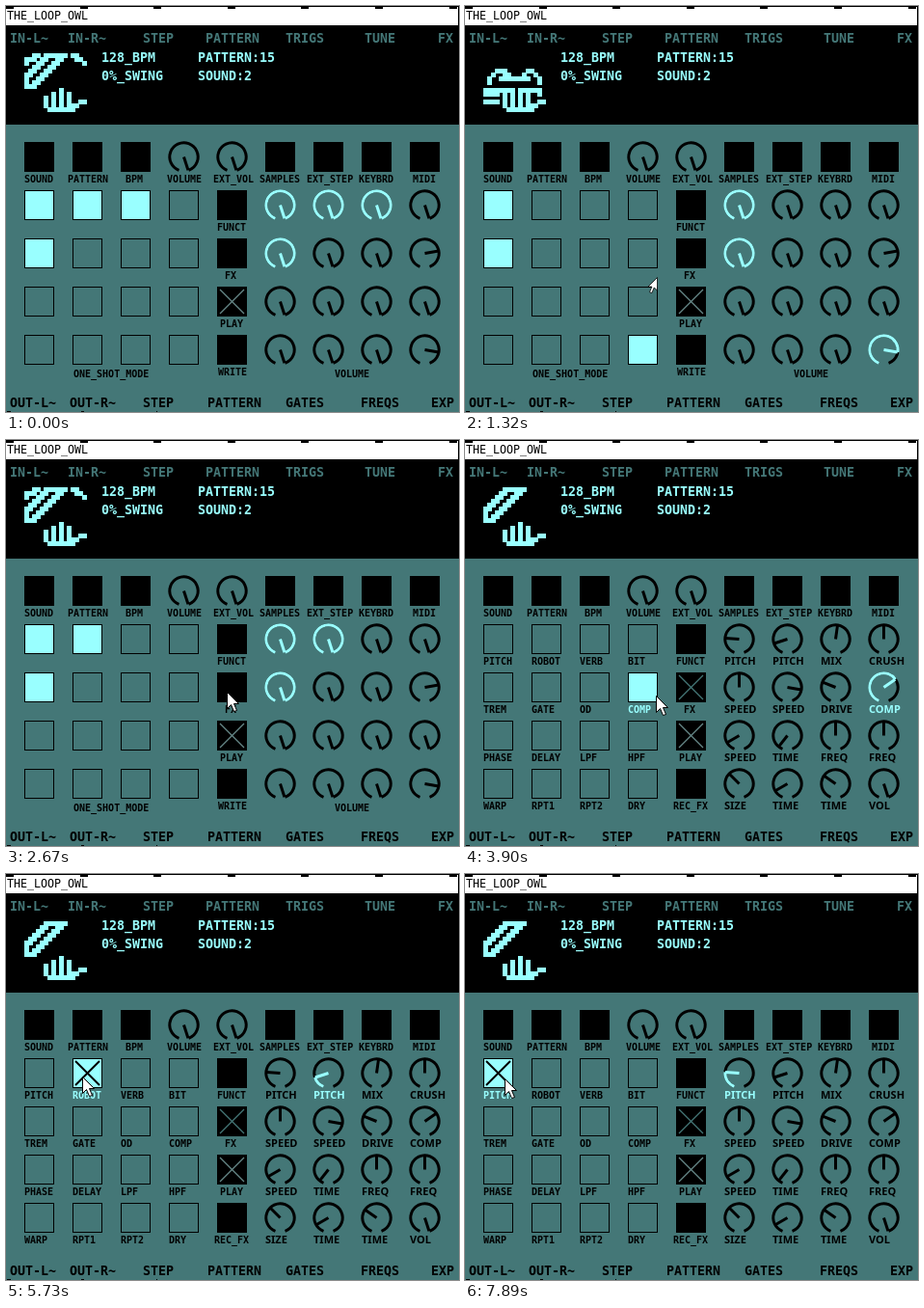
Recreate the animation shown at these times as an HTML page with a canvas. Size 470 by 421 pixels, loop 8000 ms.

```html
<!DOCTYPE html>
<html lang="en">
<head>
<meta charset="utf-8">
<title>Drum machine</title>
<style>
  html, body { margin: 0; width: 100%; height: 100%; overflow: hidden; background: #447777; }
  canvas { display: block; }
</style>
</head>
<body>
<canvas id="stage" width="470" height="421"></canvas>
<script>
const ctx = document.getElementById('stage').getContext('2d');
const LOOP = 8000, STEP = 111, ICON_STEP = 222;
const TEAL = '#447777', LIT = '#99ffff', BLACK = '#000';
const MONO = '"DejaVu Sans Mono", monospace';
const LARGE = `bold 13.3px ${MONO}`;
const SMALL = `bold 10px ${MONO}`;
const KNOB_FONT = 'bold 11px "Noto Sans", "Open Sans", sans-serif';

const FX_ON = 2850, ROBOT_ON = 5500, PITCH_ON = 6750;

const fxNames = ['PITCH', 'ROBOT', 'VERB', 'BIT', 'TREM', 'GATE', 'OD', 'COMP',
  'PHASE', 'DELAY', 'LPF', 'HPF', 'WARP', 'RPT1', 'RPT2', 'DRY'];
const fxKnobs = ['PITCH', 'PITCH', 'MIX', 'CRUSH', 'SPEED', 'SPEED', 'DRIVE', 'COMP',
  'SPEED', 'TIME', 'FREQ', 'FREQ', 'SIZE', 'TIME', 'TIME', 'VOL'];
const fxAngles = [-86, -108, 8, 0, 0, 100, -68, 55, -120, -142, 0, 0, -45, -120, -55, 162];

// Sequencer steps on which each pad lights up
const soundSteps = { 0: [0, 4, 8, 12], 1: [0, 8], 2: [0], 4: [0, 2, 4, 6, 8, 10, 12, 14], 15: [4, 12] };
const fxSteps = { 4: [0, 4, 8, 12], 7: [3, 7, 11] };

// Pointer path: time, x, y
const pointerPath = [
  [450, 480, 330], [700, 440, 310], [1320, 199, 281], [1900, 215, 275], [2400, 229, 261],
  [2800, 229, 261], [3300, 205, 262], [3900, 198, 265], [4140, 196, 264], [4920, 119, 253],
  [5480, 79, 211], [5820, 79, 210], [6030, 79, 210], [6600, 35, 214], [6900, 40, 218],
  [6930, 41, 217], [7590, 41, 217], [7890, 41, 212], [8000, 41, 212]
];

function rect(x, y, w, h, color) {
  ctx.fillStyle = color;
  ctx.fillRect(x, y, w, h);
}

function text(str, x, y, font = SMALL, color = BLACK) {
  ctx.font = font;
  ctx.fillStyle = color;
  ctx.fillText(str, x, y);
}

function line(x1, y1, x2, y2, color, width) {
  ctx.strokeStyle = color;
  ctx.lineWidth = width;
  ctx.beginPath();
  ctx.moveTo(x1, y1);
  ctx.lineTo(x2, y2);
  ctx.stroke();
}

const colX = col => 19 + 50 * col;
const rowY = row => 141 + 50 * row;

function button(col, row, fill, crossColor) {
  const x = colX(col), y = rowY(row);
  rect(x, y, 31, 31, BLACK);
  if (fill !== BLACK) rect(x + 1, y + 1, 29, 29, fill);
  if (!crossColor) return;
  const width = crossColor === BLACK ? 2 : 1.3;
  line(x + 3, y + 3, x + 28, y + 28, crossColor, width);
  line(x + 28, y + 3, x + 3, y + 28, crossColor, width);
}

function knob(col, row, degrees, lit) {
  const x = colX(col) + 15.5, y = rowY(row) + 15.5;
  const toRad = d => (d - 90) * Math.PI / 180;
  const arc = (from, to, color) => {
    ctx.strokeStyle = color;
    ctx.lineWidth = 3;
    ctx.beginPath();
    ctx.arc(x, y, 14.7, toRad(from), toRad(to));
    ctx.stroke();
  };
  arc(-160, 160, BLACK);
  if (lit) arc(-160, Math.min(degrees, 160), LIT);
  const a = toRad(degrees);
  line(x, y, x + 14.5 * Math.cos(a), y + 14.5 * Math.sin(a), lit ? LIT : BLACK, 3);
}

// Icon cells overlap by one pixel on a 4px pitch
function cells(col, row, w = 1, h = 1) {
  rect(19 + 4 * col, 49 + 4 * row, 4 * w + 1, 4 * h + 1, LIT);
}

function hand(drop = 0) {
  [11, 10, 9, 10].forEach((top, i) => cells(5 + 2 * i, top + drop, 1, 14 - top));
  cells(14, 12 + drop, 2);
  cells(12, 13 + drop, 2);
  cells(6, 14 + drop, 7);
}

function stick() {
  for (let i = 0; i < 6; i++) cells(5 - i, i, 2);
  for (let i = 0; i < 8; i++) cells(8 - i, i + 1, 2);
  cells(6, 0, 5);
  for (let i = 0; i < 4; i++) cells(9 - i, 1 + i);
  cells(0, 6, 1, 3);
  hand();
}

function crossedSticks() {
  stick();
  cells(2, 0, 2);
  cells(0, 1, 3);
  cells(0, 2, 1);
  cells(12, 0, 2);
  cells(13, 1, 2);
  cells(15, 2);
}

function face() {
  cells(3, 4, 3);
  cells(11, 4, 2);
  cells(2, 5);
  cells(5, 5, 2);
  cells(10, 5);
  cells(13, 5);
  cells(1, 6, 1, 2);
  cells(4, 6, 8);
  cells(14, 6, 1, 2);
  cells(0, 9, 7);
  cells(9, 9, 6);
  cells(0, 10, 4);
  cells(5, 9, 1, 4);
  cells(7, 9, 1, 4);
  cells(14, 10, 1);
  cells(0, 12, 4);
  cells(11, 9, 1, 4);
  hand();
}

function helmet() {
  for (let row = 0; row < 13; row++) {
    const left = Math.max(0, 7 - row);
    const right = Math.min(14, 11 + Math.floor(row * 0.8));
    cells(left, row, right - left + 1);
  }
  hand(1);
}

const A = crossedSticks, B = face, C = stick, D = helmet;
const icons = [A, B, C, B, C, A, B, C, A, B, C, B, A, B, D, B];

function drawIcon(t) {
  const index = Math.floor((t + 190) / ICON_STEP);
  icons[index % icons.length]();
}

function drawFrame() {
  rect(0, 0, 470, 421, TEAL);
  rect(0, 0, 470, 20, '#fff');
  rect(0, 0, 470, 1, BLACK);
  rect(469, 0, 1, 20, BLACK);
  for (let i = 0; i < 7; i++) rect(Math.round(76.6 * i), 0, 8, 3, BLACK);
  rect(0, 20, 470, 103, BLACK);
  text('THE_LOOP_OWL', 1, 14, `11.63px ${MONO}`);
  [['IN-L~', 4], ['IN-R~', 64], ['STEP', 142], ['PATTERN', 207], ['TRIGS', 290], ['TUNE', 372], ['FX', 448]]
    .forEach(([s, x]) => text(s, x, 38, LARGE, TEAL));
  [['OUT-L~', 4], ['OUT-R~', 66], ['STEP', 142], ['PATTERN', 209], ['GATES', 290], ['FREQS', 368], ['EXP', 441]]
    .forEach(([s, x]) => text(s, x, 416, LARGE));
  [['128_BPM', 99, 58], ['PATTERN:15', 199, 58], ['0%_SWING', 99, 77], ['SOUND:2', 199, 77]]
    .forEach(([s, x, y]) => text(s, x, y, LARGE, LIT));
  [[1, 4], [78, 3], [156, 1]].forEach(([x, w]) => rect(x, 420, w, 1, BLACK));
}

function drawTopRow() {
  for (const col of [0, 1, 2, 5, 6, 7, 8]) button(col, 0, BLACK);
  knob(3, 0, 162);
  knob(4, 0, 162);
  [['SOUND', 19], ['PATTERN', 64], ['BPM', 124], ['VOLUME', 167], ['EXT_VOL', 215],
    ['SAMPLES', 263], ['EXT_STEP', 312], ['KEYBRD', 366], ['MIDI', 422]]
    .forEach(([s, x]) => text(s, x, 183));
}

function drawPads(t) {
  const fx = t >= FX_ON;
  const held = t >= PITCH_ON ? 0 : t >= ROBOT_ON ? 1 : -1;
  const step = Math.floor(t / STEP + 0.2) % 16;
  const pattern = fx ? fxSteps : soundSteps;

  for (let i = 0; i < 16; i++) {
    const col = i % 4, row = 1 + Math.floor(i / 4);
    const lit = held >= 0 ? held === i : !!pattern[i] && pattern[i].includes(step);
    const angle = fx ? fxAngles[i] : i === 7 ? 80 : i === 15 ? 100 : 162;
    button(col, row, lit ? LIT : TEAL, held === i ? BLACK : null);
    knob(col + 5, row, angle, lit);
    if (fx) {
      const color = lit ? LIT : BLACK, y = rowY(row) + 42;
      text(fxNames[i], colX(col), y, SMALL, color);
      text(fxKnobs[i], colX(col + 5), y, KNOB_FONT, color);
    }
  }

  button(4, 1, BLACK);
  button(4, 2, BLACK, fx ? TEAL : null);
  button(4, 3, BLACK, '#668888');
  button(4, 4, BLACK);
  text('FUNCT', 219, 233);
  text('FX', 227, 283);
  text('PLAY', 222, 333);
  if (fx) {
    text('REC_FX', 216, 383);
  } else {
    text('WRITE', 220, 383);
    text('ONE_SHOT_MODE', 70, 385);
    text('VOLUME', 341, 385);
  }
}

function drawPointer(t) {
  const next = pointerPath.findIndex(p => p[0] > t);
  if (next < 1) return;
  const [t0, x0, y0] = pointerPath[next - 1], [t1, x1, y1] = pointerPath[next];
  const k = (t - t0) / (t1 - t0);
  ctx.save();
  ctx.translate(Math.round(x0 + (x1 - x0) * k) + 0.5, Math.round(y0 + (y1 - y0) * k) + 0.5);
  if (t < 1620) ctx.scale(-0.8, 0.8);
  ctx.beginPath();
  [[0, 0], [0, 17], [4, 13], [7, 20], [10, 19], [7, 12], [12, 12]].forEach(([x, y]) => ctx.lineTo(x, y));
  ctx.closePath();
  ctx.fillStyle = '#fff';
  ctx.fill();
  ctx.strokeStyle = BLACK;
  ctx.lineWidth = 1;
  ctx.stroke();
  ctx.restore();
}

function render() {
  const t = performance.now() % LOOP;
  drawFrame();
  drawIcon(t);
  drawTopRow();
  drawPads(t);
  drawPointer(t);
  requestAnimationFrame(render);
}
render();
</script>
</body>
</html>
```
